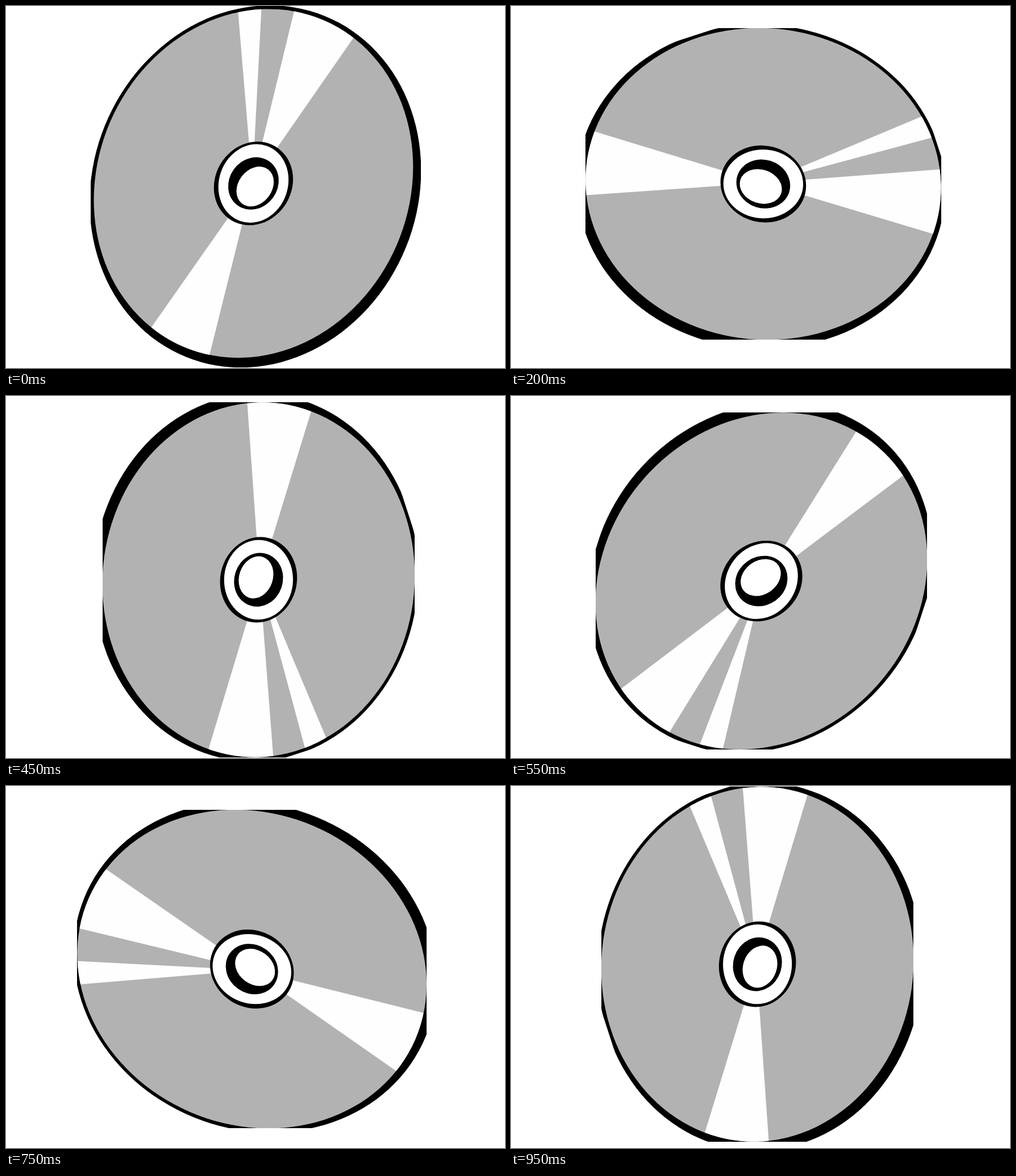
Write an HTML page with a canvas that moves like this. It is 878 px wide and 638 px high and loops after 1000 ms.

```html
<!DOCTYPE html>
<html>
<head>
<meta charset="utf-8">
<title>Spinning disc</title>
<style>
  html, body { margin: 0; width: 100%; height: 100%; overflow: hidden; background: #fff; }
  canvas { display: block; }
</style>
</head>
<body>
<canvas id="stage" width="878" height="638"></canvas>
<script>
const ctx = document.getElementById('stage').getContext('2d');
const RAD = Math.PI / 180;
const STEPS = 20, STEP_MS = 50;
const PIVOT = { x: 439, y: 319 };
const HUB = { x: 435.4, y: 312.7 };
const SHINE = { x: 433.5, y: 312.5 };

// Ellipses: centre, half width, half height, tilt in degrees
const RIM = [438.8, 318.1, 285.8, 324.3, 22.1];
const FACE = [HUB.x, HUB.y, 274.5, 313, 23.3];
const RING = [HUB.x, HUB.y, 67.4, 75.7, 30.5];
const COLLAR = [HUB.x, HUB.y, 60.6, 70.2, 19.3];
const WELL = [HUB.x, HUB.y, 42.6, 47.8, 36];
const HOLE = [438.3, 318.2, 29.6, 37.9, 37];

// Reflections: start and end, clockwise from straight up
const WEDGES = [[-4.76, 2.96], [13.6, 34.74], [194, 215]];

function trace([x, y, rx, ry, tilt]) {
  ctx.beginPath();
  ctx.ellipse(x, y, rx, ry, tilt * RAD, 0, 2 * Math.PI);
}

function oval(shape, color) {
  trace(shape);
  ctx.fillStyle = color;
  ctx.fill();
}

function wedge([from, to]) {
  ctx.beginPath();
  ctx.moveTo(SHINE.x, SHINE.y);
  for (const a of [from, to])
    ctx.lineTo(SHINE.x + 500 * Math.sin(a * RAD), SHINE.y - 500 * Math.cos(a * RAD));
  ctx.fill();
}

function clipBox(left, top, right, bottom) {
  ctx.beginPath();
  ctx.rect(left, top, right - left, bottom - top);
  ctx.clip();
}

// Crops the turned disc to the upright bounds of its face
function clipToFace(turn) {
  const [x, y, rx, ry, tilt] = FACE;
  const dx = x - PIVOT.x, dy = y - PIVOT.y;
  const c = Math.cos(turn), s = Math.sin(turn);
  const cx = PIVOT.x + dx * c - dy * s;
  const cy = PIVOT.y + dx * s + dy * c;
  const a = turn + tilt * RAD;
  const w = Math.hypot(rx * Math.cos(a), ry * Math.sin(a));
  const h = Math.hypot(rx * Math.sin(a), ry * Math.cos(a));
  clipBox(...[cx - w, cy - h, cx + w, cy + h].map(Math.round));
}

function drawDisc() {
  clipBox(149, 0, 730, 637);
  oval(RIM, '#000');
  oval(FACE, '#b2b2b2');
  ctx.save();
  trace(FACE);
  ctx.clip();
  ctx.fillStyle = '#fefefe';
  WEDGES.forEach(wedge);
  ctx.restore();
  oval(RING, '#000');
  oval(COLLAR, '#fff');
  oval(WELL, '#000');
  oval(HOLE, '#fff');
}

function draw(now) {
  const step = Math.floor(now / STEP_MS) % STEPS;
  const turn = step / STEPS * 2 * Math.PI;
  ctx.fillStyle = '#fff';
  ctx.fillRect(0, 0, 878, 638);
  ctx.save();
  if (step) clipToFace(turn);
  ctx.translate(PIVOT.x, PIVOT.y);
  ctx.rotate(turn);
  ctx.translate(-PIVOT.x, -PIVOT.y);
  drawDisc();
  ctx.restore();
}

let start;
function tick(now) {
  start ??= now;
  draw(now - start);
  requestAnimationFrame(tick);
}
draw(0);
requestAnimationFrame(tick);
</script>
</body>
</html>
```
